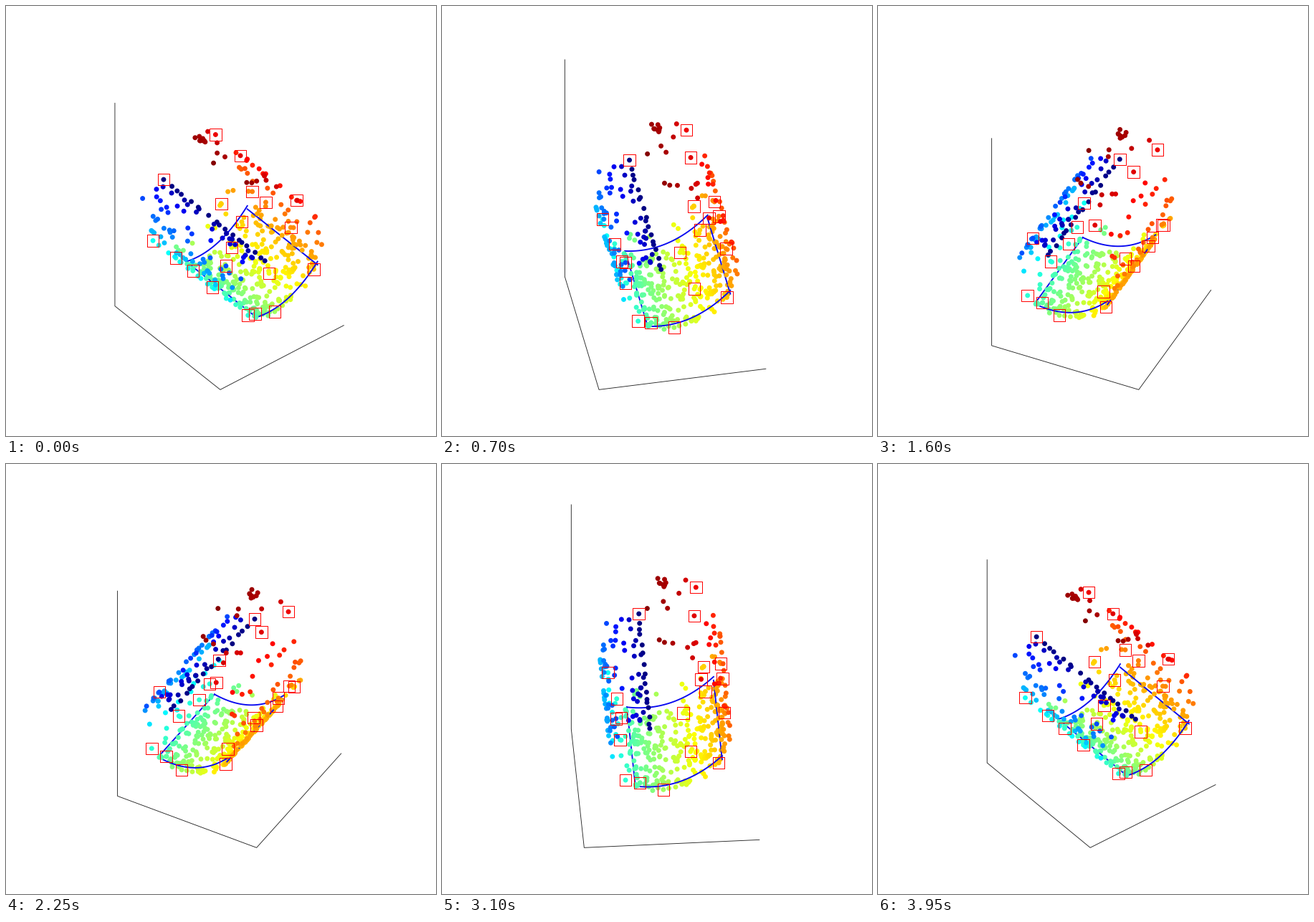
These frames come from a looping animation (600x600 px, 4000 ms). A matplotlib script:

```python
import numpy as np
import matplotlib.pyplot as plt
from matplotlib.animation import FuncAnimation

SIZE, DPI, FRAMES = 600, 100, 80
PX = 72 / DPI                            # points per pixel
BOX = np.array([0.600, 0.632, 1.0])      # relative side lengths of the axes box
CENTRE = (311.6, 290.6)
HEIGHT = 489.5
SIN_E, COS_E = np.sin(np.radians(40)), np.cos(np.radians(40))
T0, T1 = np.pi / 2, 5 * np.pi / 2        # angles at both ends of the roll
NEAR, FAR = -.316, .105                  # depth of the dense patch
rng = np.random.default_rng(11)


def roll(t, y):
    """Points of the spiral sheet for angle t and depth y."""
    r = 0.0424 * t
    return np.column_stack([-0.069 + r * np.cos(t), y, -0.0605 + r * np.sin(t)])


def jet(v):
    """Blue to red ramp made of three clipped tents."""
    return np.clip(1.5 - np.abs(4 * v[:, None] - [3, 2, 1]), 0, 1)


def uniform(n, t0, t1, y0, y1):
    return np.column_stack([rng.uniform(t0, t1, n), rng.uniform(y0, y1, n)])


# Key points as (angle, depth)
landmarks = np.array([
    (1.57, .309), (2.83, -.206), (4.00, .236), (4.16, -.097), (4.19, -.307),
    (4.19, .126), (4.25, .034), (4.51, -.286), (4.91, -.307), (5.35, .068),
    (5.40, -.144), (5.77, .103), (5.79, .230), (5.89, -.307), (6.20, -.130),
    (6.28, .025), (6.28, .106), (7.18, .232), (7.26, .061), (7.26, -.277)])

seam_y = np.linspace(.26, -.31, 17)
seam = np.column_stack([rng.uniform(T0, T0 + .12, 17),
                        seam_y + rng.normal(0, .012, 17)])

sheet = np.vstack([
    landmarks,
    seam,
    uniform(32, T0 + .25, 2.8, -.28, .31),
    uniform(152, 2.8, 7.45, -.31, .25),
    uniform(6, 7.45, T1, -.30, .10),
    rng.normal((7.63, .167), (.05, .018), (8, 2)),
    uniform(228, 4.36, 6.13, NEAR, FAR)])

points = roll(*sheet.T)
marks = roll(*landmarks.T)
colours = jet((sheet[:, 0] - T0) / (T1 - T0))
under = (sheet[:, 0] > 4.5) & (sheet[:, 0] < 6.0)

# Outline of the dense patch: two curved sides and two straight ones
u = np.linspace(0, 1, 40)[:, None]
A, C, B = np.array([(-.1245, -.236), (.036, -.270), (.1725, -.118)])
arc = (1 - u) ** 2 * A + 2 * u * (1 - u) * C + u ** 2 * B


def bow(y):
    return np.insert(arc, 1, y, axis=1)


def edge(x, z):
    return np.array([(x, NEAR, z), (x, FAR, z)])


outline = [bow(NEAR), bow(FAR), edge(*A), edge(B[0], B[1] - .016)]


def project(p, a):
    """Screen position and nearness of 3D points for azimuth a."""
    s, c = np.sin(a), np.cos(a)
    scale = HEIGHT / ((BOX[0] * abs(s) + BOX[1] * c) * SIN_E + BOX[2] * COS_E)
    x, y, z = p.T
    deep = x * s + y * c
    xy = np.column_stack([CENTRE[0] + scale * (x * c - y * s),
                          CENTRE[1] - scale * (deep * SIN_E + z * COS_E)])
    return xy, z * SIN_E - deep * COS_E


def axes_path(a):
    """Corners of the visible axes: top, left, front and right."""
    if a > 0:
        corners = [(-1, 1, 1), (-1, 1, -1), (-1, -1, -1), (1, -1, -1)]
    else:
        corners = [(-1, -1, 1), (-1, -1, -1), (1, -1, -1), (1, 1, -1)]
    return np.array(corners) * BOX / 2


def azimuth(i):
    """Swing from 39 to -39 degrees, then from -40 back to 38."""
    half = FRAMES // 2
    return np.radians(39 - 2 * i if i < half else 2 * (i - half) - 40)


fig = plt.figure(figsize=(SIZE / DPI, SIZE / DPI), dpi=DPI, facecolor="white")
ax = fig.add_axes([0, 0, 1, 1])
ax.set(xlim=(0, SIZE), ylim=(SIZE, 0))
ax.axis("off")

axes_line, = ax.plot([], [], color="#262626", lw=0.9 * PX, zorder=1,
                     solid_joinstyle="miter")
groups = [(np.flatnonzero(m), ax.scatter([], [], s=(6.9 * PX) ** 2,
                                         linewidths=0, zorder=z))
          for m, z in ((under, 2), (~under, 4))]
patch_lines = [ax.plot([], [], color="#0a0af0", lw=1.9 * PX, zorder=3)[0]
               for _ in outline]
boxes = ax.scatter([], [], s=(16.5 * PX) ** 2, marker="s", facecolors="none",
                   edgecolors="red", linewidths=PX, zorder=5)


def draw(i):
    a = azimuth(i)
    axes_line.set_data(*project(axes_path(a), a)[0].T)
    xy, near = project(points, a)
    for idx, dots in groups:
        order = idx[np.argsort(near[idx])]
        dots.set_offsets(xy[order])
        dots.set_facecolors(colours[order])
    for line, p in zip(patch_lines, outline):
        line.set_data(*project(p, a)[0].T)
    boxes.set_offsets(project(marks, a)[0])
    return [axes_line, boxes, *patch_lines, *(d for _, d in groups)]


anim = FuncAnimation(fig, draw, frames=FRAMES, interval=50, repeat=True,
                     repeat_delay=0, blit=False)
plt.show()
```
